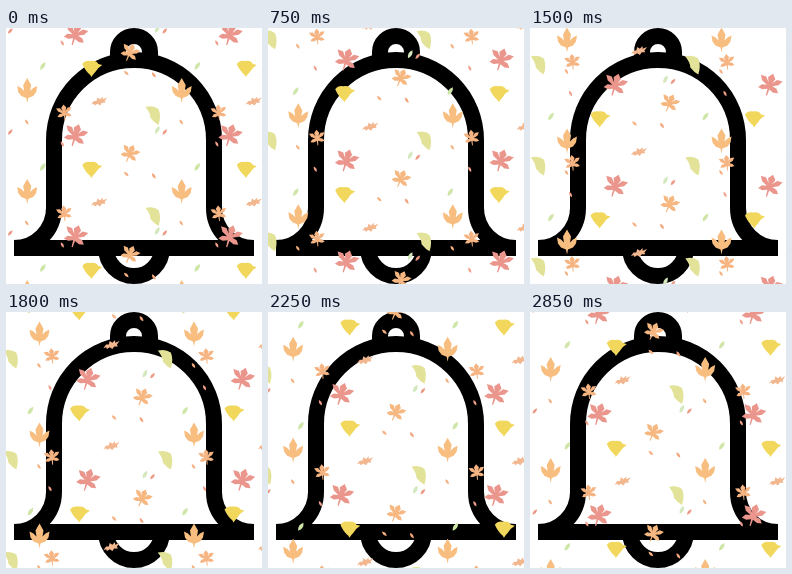
Animation, 256 px wide and 256 px high, one loop 3 s. Source, as an HTML page with a canvas:

```html
<!DOCTYPE html>
<html lang="en">
<head>
<meta charset="utf-8">
<title>Bell in falling leaves</title>
<style>
html, body { margin: 0; width: 100%; height: 100%; overflow: hidden; background: #fff; }
canvas { display: block; width: 256px; height: 256px; }
</style>
</head>
<body>
<canvas id="stage" width="256" height="256"></canvas>
<script>
const ctx = document.getElementById('stage').getContext('2d');
const LOOP = 3000, STEP = 150, TILE_W = 154.5, TILE_H = 101;

const bell = new Path2D(
  'M8 220H248 M8 220A40 40 0 0 0 48 180V112A80 80 0 0 1 208 112V180A40 40 0 0 0 248 220' +
  'M112 32V24A16 16 0 0 1 144 24V32 M100 220A28 28 0 0 0 156 220');

const shapes = {
  maple: 'M-2-3L-4-8 0-13 4-8 2-3 6-8 12-8 9-3 3 0 8 1 11 5 6 6 1 4 .6 11-.6 11-1 4-6 6-11 5-8 1-3 0-9-3-12-8-6-8Z',
  trident: 'M0-12L4-5 3 1 6-2 10-4 9 2 6 6 1 8 0 13-1 8-6 6-9 2-10-4-6-2-3 1-4-5Z',
  ginkgo: 'M-10-4Q-7-8-2-7Q4-8 6-4L10-3Q5 0 3 4Q1 6-1 9L-2 7Q-7 3-10-4Z',
  fan: 'M-8-8Q0-10 5-6Q8 1 5 10Q1 8-3 3Q-3-2-8-8Z',
  oak: 'M-9 4L-6 0-3 0-2-4 1-2 4-5 4-2 9-4 6 0 7 2 3 2 1 5-2 3-5 5-6 3Z',
  blade: 'M0-5Q4 0 0 5Q-4 0 0-5Z'
};
for (const k in shapes) shapes[k] = new Path2D(shapes[k]);

// shape, colour, mean x, start y, sway direction, scale, turn
const leaves = [
  ['maple', '#eb968c', 77, 108, 1, .95, .3],
  ['trident', '#f8be80', 29, 163, 1, 1, 0],
  ['ginkgo', '#f1d85c', 78.5, 141, -1, 1, 0],
  ['maple', '#f6b482', 50.5, 85, -1, .65, -.1],
  ['maple', '#f6b780', 131.5, 126, 1, .76, .4],
  ['oak', '#f3b790', 101, 73, 1, .9, 0],
  ['fan', '#e2e298', 155.3, 87, 1, 1, 0],
  ['blade', '#cfe6a8', 29, 139, -1, .95, .6],
  ['blade', '#d3e8bc', 143.5, 102, -1, .9, .5],
  ['blade', '#ec9a86', 151, 104, -1, .7, .7],
  ['blade', '#f5b080', 28.5, 94, 1, .6, -.6],
  ['blade', '#f0a08c', 48.5, 116, -1, .6, -.5],
  ['blade', '#f6b184', 112.5, 146, -1, .65, -.8],
  ['blade', '#f2a57c', 140, 47, -1, .65, -.6]
];

function draw(p) {
  ctx.fillStyle = '#fff';
  ctx.fillRect(0, 0, 256, 256);
  ctx.lineWidth = 16;
  ctx.strokeStyle = '#000';
  ctx.stroke(bell);

  const a = 2 * Math.PI * p;
  const sway = -8.3 * Math.cos(a + .314) - .6 + .7 * Math.cos(2 * a);
  for (const [shape, colour, x0, y0, dir, scale, turn] of leaves) {
    const x = x0 + dir * sway;
    const y = (y0 + p * TILE_H) % TILE_H;
    ctx.fillStyle = colour;
    for (let i = -1; i < 2; i++) {
      for (let j = -1; j < 4; j++) {
        ctx.save();
        ctx.translate(x + i * TILE_W, y + j * TILE_H);
        ctx.rotate(turn);
        ctx.scale(scale, scale);
        ctx.fill(shapes[shape]);
        ctx.restore();
      }
    }
  }
}

const start = performance.now();
function tick() {
  const t = (performance.now() - start) % LOOP;
  draw(Math.floor(t / STEP) * STEP / LOOP);
  requestAnimationFrame(tick);
}
tick();
</script>
</body>
</html>
```
